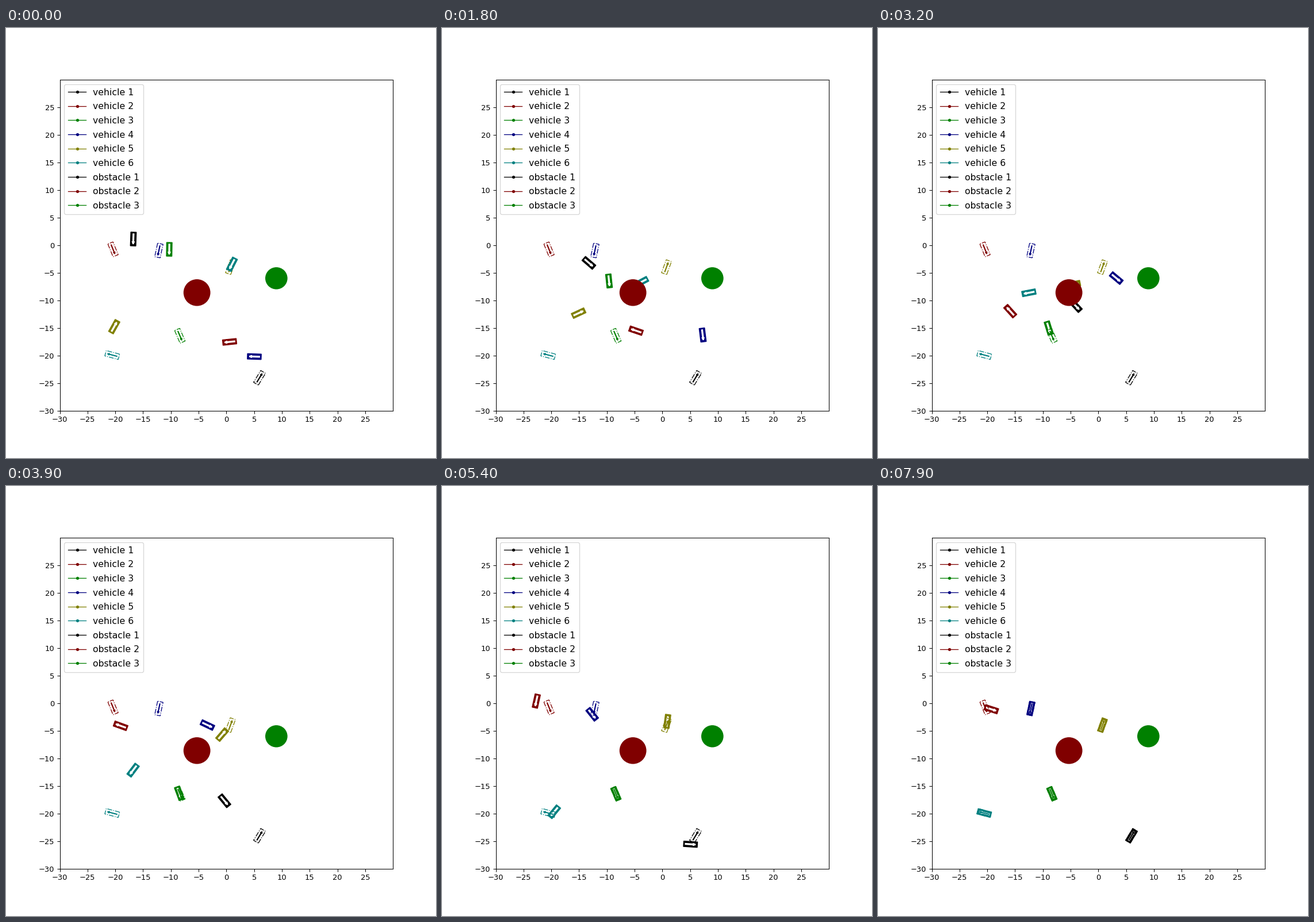
Recreate the animation shown at these times as a matplotlib script. Size 748 by 748 pixels, loop 8000 ms.

```python
import numpy as np
import matplotlib.pyplot as plt
from matplotlib.animation import FuncAnimation
from matplotlib.patches import Circle, Polygon

FRAMES, INTERVAL = 80, 100
STOPS = np.array([0, 17, 31, 46, 62, 74])  # steps at which all cars pass a pose
COLORS = ["black", "maroon", "green", "navy", "olive", "teal"]


def box(length, width):
    x, y = length / 2, width / 2
    return np.array([(-x, -y), (x, -y), (x, y), (-x, y)])


def arrow(shaft, head):
    side = np.array([(-0.9, shaft), (0.55, shaft), (0.55, head), (0.9, 0)])
    return np.vstack([side, side[-2::-1] * (1, -1)])


BODY, STRIPE, MARK = box(2.5, 1), arrow(0.05, 0.13), arrow(0.04, 0.18)


def place(shape, x, y, deg):
    a = np.radians(deg)
    turn = np.array([[np.cos(a), np.sin(a)], [-np.sin(a), np.cos(a)]])
    return shape @ turn + (x, y)


class Car:
    """Drives through poses (x, y, heading), moving only along its heading."""

    def __init__(self, color, *poses, goal=None):
        x, y, self.deg = np.array(poses, float).T
        self.pos, self.t = x + 1j * y, STOPS[:len(poses)]
        chord = np.diff(self.pos) / np.diff(self.t)
        ahead = np.exp(1j * np.radians(self.deg[1:-1]))
        gear = np.sign((chord[:-1] * ahead.conj()).real)
        speed = (abs(chord[:-1]) + abs(chord[1:])) / 2
        self.vel = np.concatenate([[0], gear * speed * ahead, [0]])

        goal = goal or poses[-1]
        self.body = Polygon(BODY, fc=color, ec=color, lw=1)
        self.stripe = Polygon(STRIPE, fc="white", ec="white", lw=1.8)
        slot = Polygon(place(BODY, *goal), fill=False, ec=color, lw=1, ls="-.")
        mark = Polygon(place(MARK, *goal), fc=color, ec=color, lw=1)
        for patch in (self.body, self.stripe, slot, mark):
            ax.add_patch(patch)

    def pose(self, step):
        s = min(step, self.t[-1])
        i = min(np.searchsorted(self.t, s, "right"), len(self.t) - 1) - 1
        h = self.t[i + 1] - self.t[i]
        u = (s - self.t[i]) / h
        w = u * u * (3 - 2 * u)
        p = ((1 - w) * self.pos[i] + w * self.pos[i + 1]
             + h * u * (1 - u) * ((1 - u) * self.vel[i] - u * self.vel[i + 1]))
        return p.real, p.imag, np.interp(s, self.t, self.deg)

    def move(self, step):
        pose = self.pose(step)
        self.body.set_xy(place(BODY, *pose))
        self.stripe.set_xy(place(STRIPE, *pose))


fig, ax = plt.subplots(figsize=(8, 8), dpi=93.5)
ax.set(xlim=(-30, 30), ylim=(-30, 30),
       xticks=range(-30, 30, 5), yticks=range(-30, 30, 5))

for kind, count in (("vehicle", 6), ("obstacle", 3)):
    for n in range(count):
        ax.plot([], [], ".-", color=COLORS[n], lw=1, label=f"{kind} {n + 1}")
ax.legend(loc="upper left", fontsize=12, labelspacing=0.62,
          borderpad=0.45, handletextpad=0.75)

cars = [
    Car("black", (-16.75, 1.11, -92), (-13.23, -3.21, -41), (-4.09, -10.99, -47),
        (2.81, -24.88, -55), (6.69, -22.95, 62), (5.97, -24.04, 59)),
    Car("maroon", (0.58, -17.53, 186), (-4.75, -15.5, 161), (-15.87, -11.96, 132),
        (-22.65, 1.9, 192), (-19.28, -1.1, 342), goal=(-20.41, -0.76, -68)),
    Car("green", (-10.28, -0.76, -91), (-9.61, -6.49, -84), (-8.94, -15.03, -73),
        (-8.37, -16.42, -67)),
    Car("navy", (5.03, -20.19, 178), (7.26, -16.28, 277), (3.22, -5.97, 320),
        (-10.91, -3.63, 351), (-11.63, 0.65, 254), (-12.15, -0.97, 258)),
    Car("olive", (-20.19, -14.77, 61), (-15.08, -12.32, 25), (-4.49, -7.11, 12),
        (1.0, -3.68, 92), (0.74, -3.99, 70)),
    Car("teal", (1.0, -3.47, 243), (-3.76, -6.66, 208), (-12.51, -8.63, 191),
        (-18.69, -17.69, 281), (-21.83, -19.82, 166), (-20.55, -19.91, 165)),
]

for center, radius, color in (((-5.3, -8.6), 2.42, "maroon"), ((9, -6), 2, "green")):
    ax.add_patch(Circle(center, radius, fc=color, ec="none", zorder=3))


def update(frame):
    for car in cars:
        car.move(max(frame - 1, 0))
    return []


anim = FuncAnimation(fig, update, frames=FRAMES, interval=INTERVAL,
                     repeat=True, repeat_delay=0, blit=False)
plt.show()
```
